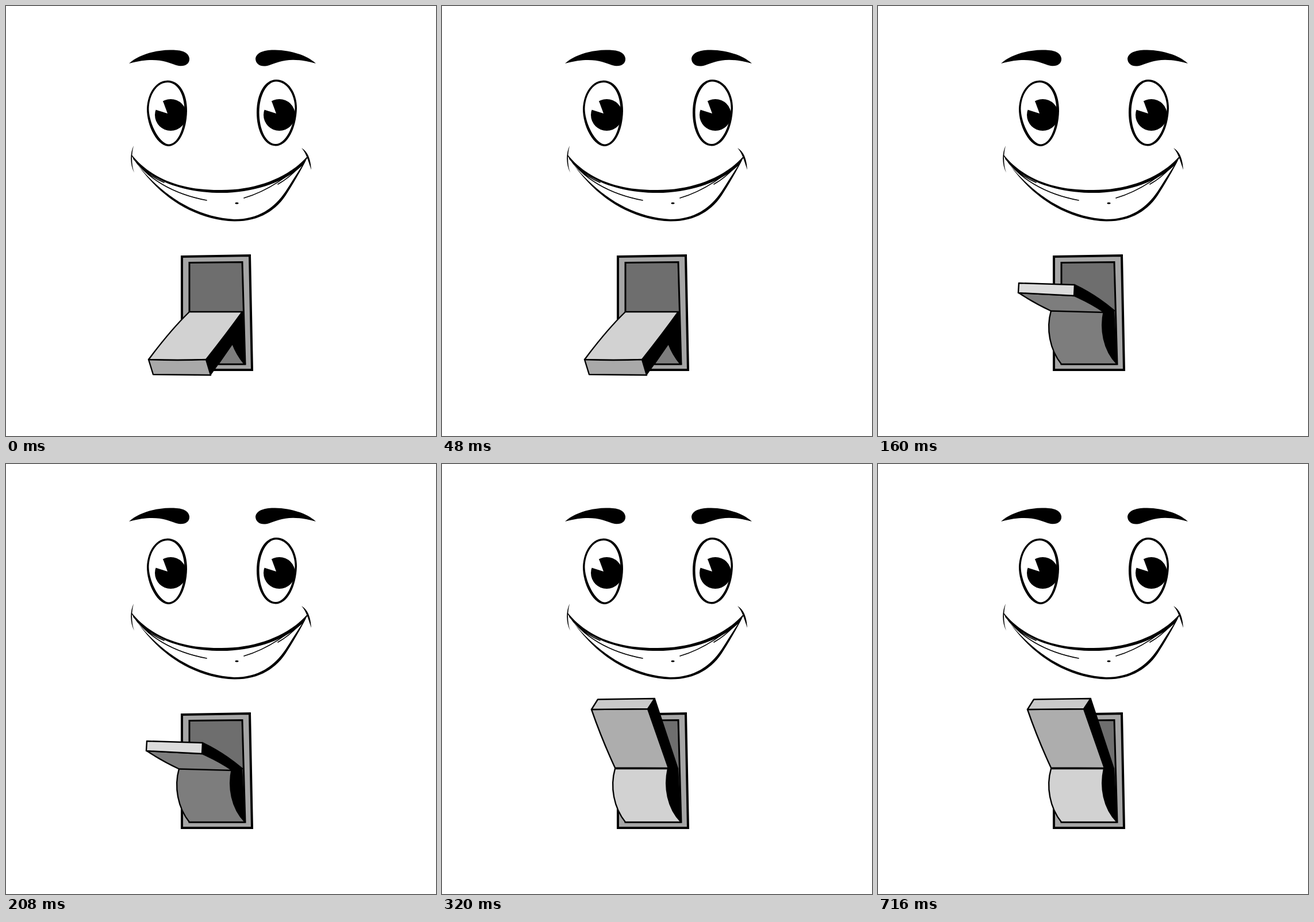
An HTML page for the animation above (0.98 s loop, 748x748 px).

```html
<!DOCTYPE html>
<html lang="en">
<head>
<meta charset="utf-8">
<title>Switch</title>
<style>
  html, body { margin: 0; height: 100%; overflow: hidden; background: #fff; }
  svg { display: block; width: 100%; height: 100%; }
  .line { fill: none; stroke: #000; stroke-linecap: round; stroke-width: 1.6; }
  .white { fill: #fff; }
  #plate, #lever { stroke: #000; stroke-width: 2.4; stroke-linejoin: round; }
  #plate { stroke-width: 3; stroke-linejoin: miter; }
</style>
</head>
<body>
<svg viewBox="0 0 748 748">
  <g id="brows">
    <path d="M214 100C229 86 256 77 285 76.500C303 76 317 79 319 91C320 102 309 107 296 103C279 97 259 88 214 100Z"/>
    <path d="M539 100C524 86 496 77 468 76.500C449 76 435 81 434 92C435 103 445 107 458 103C475 97 494 87 539 100Z"/>
  </g>
  <g id="eyes">
    <path d="M281 129.500C303 130 315 153 315 183C314 217 301 244 282 244C263 243 245 209 245 179C246 151 261 130 281 129.500Z"/>
    <path class="white" d="M281 133C299 133 311 155 310.500 184C310 215 298 240.500 283 240.500C268 240 249 206 248.500 179C249 154 263 133 281 133Z"/>
    <path d="M470 128C491 128 506 151 506 178C505 212 490 243.500 469 243.500C449 243 436 217 436 185C436 153 450 128 470 128Z"/>
    <path class="white" d="M470 131.500C488 131.500 502.500 153 502.500 178C501.500 210 486 240 469 240C453 240 440.500 216 440.500 185C440.500 155 454 131.500 470 131.500Z"/>
    <g id="pupil">
      <circle cx="286.500" cy="189.500" r="27.500"/>
      <path class="white" d="M270 160L274 168L281 187L262 181L254 178Z"/>
    </g>
    <use href="#pupil" x="189"/>
  </g>
  <g id="mouth">
    <path d="M218 258C255 304 311 321 375 320C437 320 492 298 526 260C518 277 504 302 490 324C471 356 440 375 397 374.500C323 371 262 329 218 260Z"/>
    <path class="white" d="M228 275C266 310 318 325 375 325C431 325 485 306 515 278C506 291 497 306 486 323C466 352 439 371 397 371C328 367 272 329 228 275Z"/>
    <path class="line" d="M222 265C246 300 290 327 349 338M222 266C240 287 256 300 275 307M523 264C495 295 455 322 414 334M522 265C506 287 491 300 473 310"/>
    <path d="M222 243C218 258 218 276 223 290C216 276 215 258 222 243ZM514 247C526 254 530 268 531 285C525 267 522 256 514 247Z"/>
    <ellipse cx="401.500" cy="343" rx="3" ry="1.600"/>
  </g>
  <g id="plate">
    <path fill="#a6a6a6" stroke-width="4" d="M306 436L424 434L428 633L306 633Z"/>
    <path fill="#6e6e6e" d="M319 446.500L411 445.500L416 623L319 623Z"/>
  </g>
  <g id="lever"></g>
</svg>
<script>
const STEP = 80, LOOP = 980;
const BLACK = '#000', SHADE = '#7d7d7d', MID = '#adadad', LIGHT = '#d2d2d2', BRIGHT = '#dcdcdc';

const shape = (fill, d) => `<path fill="${fill}" d="${d}"/>`;

// Lower half of the rocker once it has swung out of the plate.
const rocker = fill =>
  shape(BLACK, 'M393 530L410 530L415 622C398 610 386 570 393 530Z') +
  shape(fill, 'M301 530C292 562 299 598 319 623L416 623C392 598 386 562 393 530Z');

const poses = [
  shape(BLACK, 'M411 532L416 623L394 587L355 642L348 615Z') +
  shape(SHADE, 'M394 587Q401 606 415 623L369 623Z') +
  shape(LIGHT, 'M319 532L411 532Q383 571 348 615Q298 617 248 615Q286 564 319 532Z') +
  shape('#a9a9a9', 'M248 615Q298 617 348 615L356 642L256 641Z'),

  shape(BLACK, 'M411 531L416 623L385 610L391 564Z') +
  shape(SHADE, 'M304 596Q309 611 319 623L416 623C397 604 390 582 391 562L344 596Z') +
  shape(BLACK, 'M411 531L342 568L344 597L391 564Z') +
  shape(LIGHT, 'M319 531.500L411 531Q377 552 342 568Q292 567 243 566Q281 548 319 531.500Z') +
  shape(BRIGHT, 'M243 566Q292 567 342 568L344 597L246 596Z'),

  rocker(SHADE) +
  shape(BLACK, 'M342 485Q378 502 411 530L394 534L341 504Z') +
  shape(SHADE, 'M245 499L341 504Q369 516 394 533L301 530.500Q270 516 245 499Z') +
  shape(BRIGHT, 'M245 482L342 485L341 504L244 499Z'),

  rocker(LIGHT) +
  shape(BLACK, 'M358 425L370 413C376 450 392 497 410 530L392 528C374 500 362 462 358 425Z') +
  shape(LIGHT, 'M259 426L358 425C362 462 374 500 392 528Q347 531 301 529C280 500 266 464 259 426Z') +
  shape(LIGHT, 'M259 426L272 413L370 412L358 425Z'),

  rocker(LIGHT) +
  shape(BLACK, 'M358 426L370 409L410 530L394 529Z') +
  shape(MID, 'M260 427L358 426L394 529L301 528.500Q278 479 260 427Z') +
  shape('#cacaca', 'M260 427L271 409.500L370 408L358 426Z')
];

const lever = document.getElementById('lever');
let shown = -1;
function draw(now) {
  const pose = Math.min(poses.length - 1, Math.floor(now % LOOP / STEP));
  if (pose !== shown) lever.innerHTML = poses[shown = pose];
}
function tick() {
  draw(performance.now());
  requestAnimationFrame(tick);
}
tick();
</script>
</body>
</html>
```
